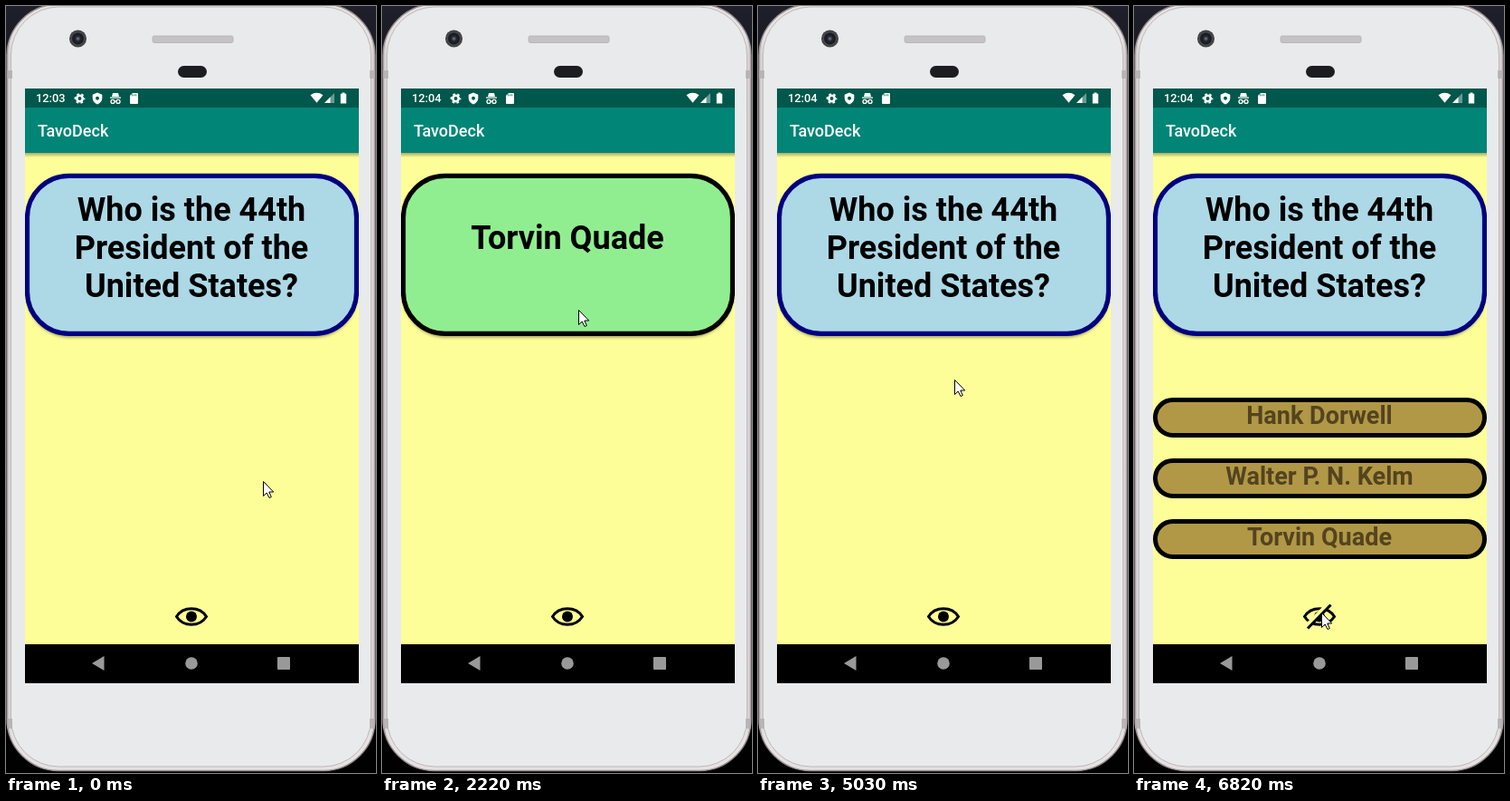
An HTML page that plays this animation: 409x846 px, repeating every 8 s.

```html
<!DOCTYPE html>
<html lang="en">
<head>
<meta charset="utf-8">
<title>Flash cards</title>
<style>
  html, body { margin: 0; width: 100%; height: 100%; overflow: hidden; background: #08080c; }
  svg { display: block; width: 100vw; height: 100vh; }
  text { font-family: Roboto, sans-serif; }
  .big { font-size: 36px; font-weight: 700; text-anchor: middle; }
  .choice { font-size: 27px; font-weight: 700; text-anchor: middle; fill: #54431f; }
</style>
</head>
<body>
<svg viewBox="0 0 409 846" preserveAspectRatio="none">
  <defs>
    <linearGradient id="desk" x2="0" y2="1">
      <stop offset="0" stop-color="#20202c"/><stop offset=".1" stop-color="#14141c"/><stop offset="1" stop-color="#000"/>
    </linearGradient>
    <linearGradient id="rim">
      <stop offset="0" stop-color="#c3bcbd"/><stop offset=".012" stop-color="#e6e2e2"/>
      <stop offset=".988" stop-color="#e6e2e2"/><stop offset="1" stop-color="#c3bcbd"/>
    </linearGradient>
    <linearGradient id="drop" x2="0" y2="1">
      <stop offset="0" stop-color="#756f40" stop-opacity=".6"/><stop offset="1" stop-color="#756f40" stop-opacity="0"/>
    </linearGradient>
    <radialGradient id="lens">
      <stop offset="0" stop-color="#6f7f92"/><stop offset=".3" stop-color="#202630"/>
      <stop offset=".6" stop-color="#17181c"/><stop offset=".75" stop-color="#4b4c50"/><stop offset="1" stop-color="#38393c"/>
    </radialGradient>
    <filter id="soft" x="-5%" y="-5%" width="110%" height="115%"><feGaussianBlur stdDeviation="1.6"/></filter>
    <clipPath id="screen"><rect x="21" y="91" width="369" height="656"/></clipPath>
  </defs>

  <rect width="409" height="846" fill="url(#desk)"/>
  <rect x="1" y="-2" width="407" height="845.5" rx="57" fill="url(#rim)" stroke="#948c8e" stroke-width="1.4"/>
  <rect x="5.5" y="1" width="398" height="838" rx="53" fill="#e9eaec" stroke="#bdb7b8"/>
  <g fill="#b1abac">
    <path d="M1 71h6v9H1zM402 71h6v9h-6zM1 786h6v11H1zM402 786h6v11h-6z" opacity=".75"/>
  </g>
  <circle cx="79.500" cy="36" r="9.500" fill="url(#lens)"/>
  <rect x="162" y="33" width="89" height="7.500" rx="2" fill="#c4c2c3" stroke="#b1afb0" stroke-width=".8"/>
  <rect x="190" y="66" width="32" height="13" rx="6.500" fill="#1d1d21"/>

  <g clip-path="url(#screen)">
    <rect x="21" y="91" width="369" height="656" fill="#fefe98"/>
    <rect x="21" y="162" width="369" height="5" fill="url(#drop)"/>
    <rect x="21" y="112" width="369" height="50" fill="#008577"/>
    <rect x="21" y="91" width="369" height="21" fill="#00574b"/>
    <text id="clock" x="33" y="106.300" font-size="12.800" font-weight="500" fill="#fff"></text>
    <text x="35" y="144.200" font-size="18" font-weight="500" fill="#fff">TavoDeck</text>

    <g fill="#fff">
      <circle cx="81.500" cy="102" r="3.200" fill="none" stroke="#fff" stroke-width="2.600"/>
      <circle cx="81.500" cy="102" r="5" fill="none" stroke="#fff" stroke-width="1.800" stroke-dasharray="2.618" stroke-dashoffset="1.300"/>
      <path d="M101 95.500l5.300 2.200v3.800q0 4.700-5.300 6.900-5.300-2.200-5.300-6.900v-3.800z"/>
      <circle cx="101" cy="101.700" r="2" fill="#00574b"/>
      <path d="M118 96h6l1 4h-8zM115 100.500h12v1.300h-12z"/>
      <path d="M119.500 105h3" stroke="#fff"/>
      <g fill="none" stroke="#fff" stroke-width="1.300"><circle cx="118" cy="105.400" r="2"/><circle cx="124" cy="105.400" r="2"/></g>
      <path d="M140 96h5q1 0 1 1v10q0 1-1 1h-7q-1 0-1-1V99z"/>
      <path d="M336.500 98.200q7-4.800 14 0l-7 8.600z"/>
      <path d="M363 96v11h-11z" opacity=".4"/>
      <path d="M358.500 100.500v6.500H352z"/>
      <path d="M371.500 95.500h3v1.200h1.700v10.800h-6.400V96.700h1.700z"/>
    </g>
    <path d="M139.500 97.300v2m2-2v2m2-2v2" stroke="#00574b" stroke-width=".8"/>

    <rect x="22" y="188" width="367" height="178" rx="49" fill="#5e5a28" opacity=".5" filter="url(#soft)"/>
    <rect id="card" x="23.500" y="187.300" width="364" height="174" rx="46" stroke-width="5.200"/>
    <g id="question" class="big">
      <text x="205" y="236.500">Who is the 44th</text>
      <text x="205" y="278.500">President of the</text>
      <text x="205" y="320.500">United States?</text>
    </g>
    <text id="answer" class="big" x="205" y="267.500">Torvin Quade</text>

    <g id="choices"></g>

    <g fill="none" stroke="#000">
      <path d="M188.500 673.500Q194 664.800 205 664.800T221.500 673.500Q216 682.300 205 682.300T188.500 673.500z" stroke-width="3"/>
      <circle cx="205" cy="673.500" r="6" fill="#000" stroke="none"/>
      <g id="slash">
        <path d="M190 684L214.500 659.500" stroke="#fefe98" stroke-width="4"/>
        <path d="M192 686.500L217.500 660.500" stroke-width="3"/>
      </g>
    </g>

    <rect x="21" y="704" width="369" height="43"/>
    <g fill="#999">
      <path d="M95 725l13.500-8v16z"/>
      <circle cx="205" cy="725" r="6.800"/>
      <rect x="300" y="718" width="14" height="14" rx="1"/>
    </g>
  </g>

  <path id="cursor" d="M.5 .5V16.500L4.200 13L7 18.500L9.300 17.500L6.800 12H11.700z" fill="#fff" stroke="#000" stroke-linejoin="round"/>
</svg>

<script>
const LOOP = 8000;
const $ = id => document.getElementById(id);

// Pointer tip: [start ms, x, y]
const path = [
  [0, 284, 524], [810, 272, 484], [930, 236, 390], [1050, 217, 337], [1200, 217, 335],
  [5030, 217, 412], [5150, 219, 534], [5300, 222, 566], [5420, 224, 602], [5540, 222, 624],
  [5840, 218, 638], [5960, 215, 647], [6120, 212, 659], [6270, 208, 667], [6420, 208, 669], [6570, 207, 669]
];

$('choices').innerHTML = ['Hank Dorwell', 'Walter P. N. Kelm', 'Torvin Quade'].map((name, i) => {
  const y = 432 + i * 67;
  return `<rect x="23.500" y="${y + 2.5}" width="364" height="39" rx="19.500" fill="#b19846" stroke="#000" stroke-width="5"/>
    <text class="choice" x="205" y="${y + 28.5}">${name}</text>`;
}).join('');

function show(id, on) {
  $(id).setAttribute('visibility', on ? 'visible' : 'hidden');
}

function draw(t) {
  const flipped = t >= 2220 && t < 3780;
  const open = t >= 6820;
  const [, x, y] = path.findLast(step => step[0] <= t);

  $('clock').textContent = t < 1950 ? '12:03' : '12:04';
  $('card').setAttribute('fill', flipped ? '#90ee90' : '#add8e6');
  $('card').setAttribute('stroke', flipped ? '#000' : '#000080');
  show('question', !flipped);
  show('answer', flipped);
  show('choices', open);
  show('slash', open);
  $('cursor').setAttribute('transform', `translate(${x} ${y})`);
}

const start = performance.now();
function tick() {
  draw((performance.now() - start) % LOOP);
  requestAnimationFrame(tick);
}
tick();
</script>
</body>
</html>
```
